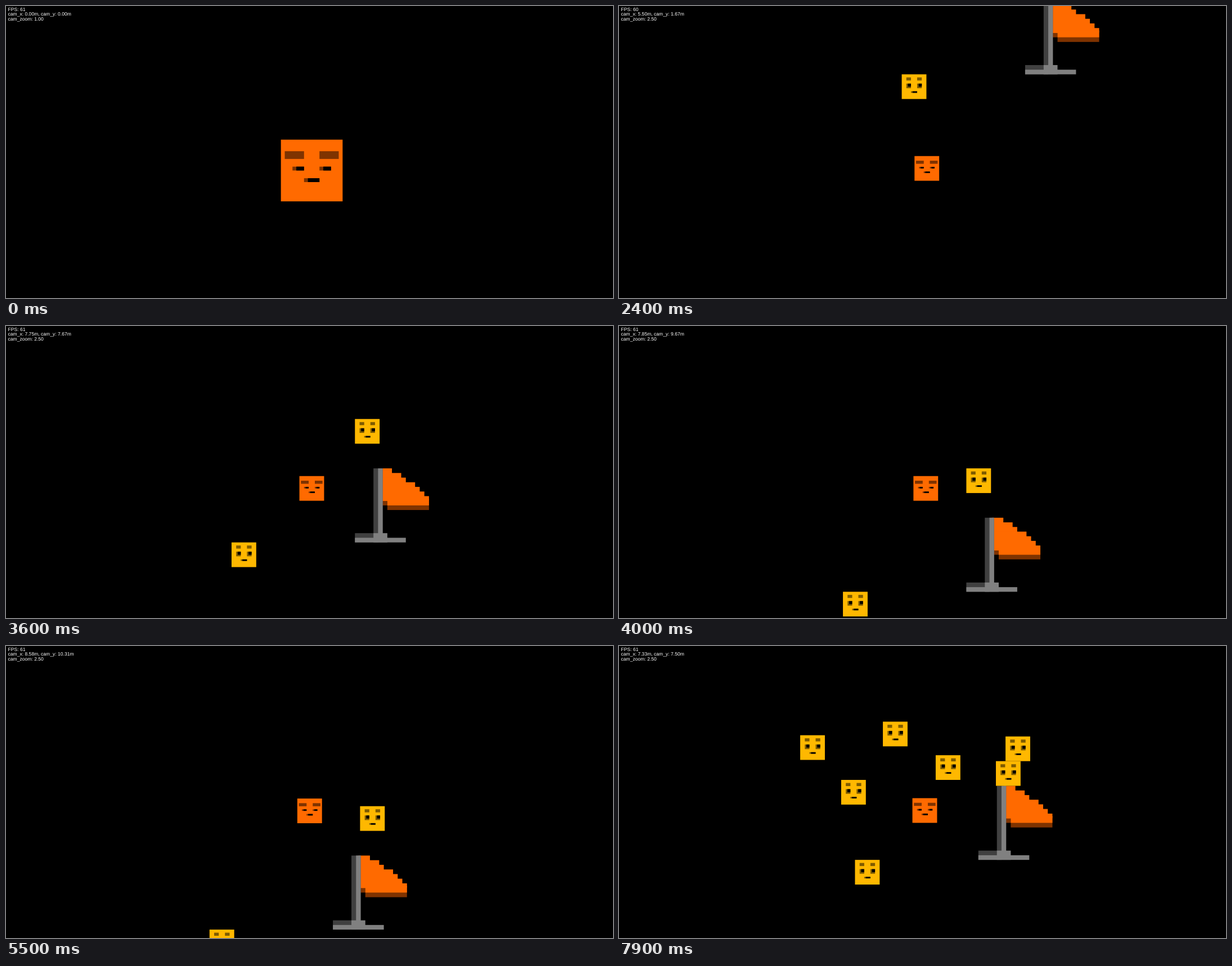
These frames come from a looping animation (1079x519 px, 8000 ms). An HTML page with a canvas:

```html
<!DOCTYPE html>
<html lang="en">
<head>
<meta charset="utf-8">
<title>Block camera</title>
<style>
  html, body { margin: 0; width: 100%; height: 100%; overflow: hidden; background: #000; }
  canvas, svg { position: absolute; left: 0; top: 0; width: 1079px; height: 519px; display: block; }
  text {
    font: 8.57px "Liberation Sans", Arial, sans-serif;
    fill: #fff;
    text-rendering: geometricPrecision;
  }
</style>
</head>
<body>
<canvas id="stage" width="1079" height="519"></canvas>
<svg viewBox="0 0 1079 519">
  <text id="fps" x="3.5" y="8.9"></text>
  <text id="pos" x="3.5" y="17.4"></text>
  <text id="zoom" x="3.5" y="26"></text>
</svg>
<script>
const LOOP = 8000, STEP = 100;
const METRE = 109.67;                        // pixels per metre at zoom 1
const CENTRE = { x: 543.5, y: 292.4 };
const SPEED = 5, ACCEL = 35, PUSH = 0.515;   // m/s, m/s², share of speed left when pushing
const ORANGE = '#ff6a00', RUST = '#7f3300', YELLOW = '#ffb800', OLIVE = '#7f5c00';
const GREY = '#808080', DARK = '#404040', BLACK = '#000';

// Each key press: axis, start in ms, metres travelled, metres before touching the block
const MOVES = [
  { axis: 'x', at: 1225, dist: 7.75 },
  { axis: 'y', at: 1991, dist: 10.33 },
  { axis: 'x', at: 3922, dist: 2.35, free: 1.25 },
  { axis: 'x', at: 5120, dist: -2.773 },
  { axis: 'y', at: 5466, dist: -2.83 },
];
// Blocks set down by clicks
const CLICKS = [
  { at: 6600, x: 2.78, y: 10.05 },
  { at: 6900, x: 6.13, y: 10.6 },
  { at: 7100, x: 8.27, y: 9.24 },
  { at: 7400, x: 4.44, y: 8.24 },
  { at: 7700, x: 10.71, y: 9 },
];
const DIPS = [600, 2400, 6700], DIP_TIME = 900;
const BLINK_FROM = 1500, BLINK_EVERY = 2700, BLINK_TIME = 700;

// Sprites are lists of [colour, x, y, width, height] on a 16 x 16 grid.
function face(skin, shade, brow, eye, mouth) {
  const shaded = (x, y, w, h) => [
    [shade, x, y, w, h],
    [BLACK, x + 1, y, w - 1, Math.max(1, h - 1)]];
  return [
    [skin, 0, 0, 16, 16],
    [shade, brow.x, brow.y, brow.w, 2], [shade, 10, brow.y, brow.w, 2],
    ...shaded(3, eye.y, 3, eye.h), ...shaded(10, eye.y, 3, eye.h),
    ...shaded(6, mouth.y, 4, mouth.h)];
}
const SLEEPY = face(ORANGE, RUST, { x: 1, y: 3, w: 5 }, { y: 7, h: 1 }, { y: 10, h: 1 });
const AWAKE = face(ORANGE, RUST, { x: 1, y: 2, w: 5 }, { y: 6, h: 3 }, { y: 10, h: 3 });
const BLOCK = face(YELLOW, OLIVE, { x: 3, y: 2, w: 3 }, { y: 6, h: 3 }, { y: 11, h: 1 });

// Parts overlap so that soft edges leave no seams.
const cloth = Array.from({ length: 7 }, (_, row) => {
  const end = Math.min(16, Math.ceil(8 + 1.35 * row));
  return [ORANGE, 5.5, row, end - 5.5, 7 - row];
});
const FLAG = [
  [RUST, 7, 7, 9, 2], [RUST, 5.5, 6.5, 1.5, 1.5],
  ...cloth, [ORANGE, 7, 6.5, 9, 1.5],
  [DARK, 4, 0, 2, 15], [DARK, 0, 14, 5, 2],
  [GREY, 5, 0, 1, 15], [GREY, 4, 14, 3, 2], [GREY, 0, 15, 11, 1]];

const ctx = document.getElementById('stage').getContext('2d');
const label = (id, text) => { document.getElementById(id).textContent = text; };
const clamp = (v, lo, hi) => Math.min(hi, Math.max(lo, v));

// Distance covered while speeding up, then at full speed
function run(sec) {
  const ramp = SPEED / ACCEL;
  if (sec <= 0) return 0;
  return sec < ramp ? ACCEL * sec * sec / 2 : SPEED * (sec - ramp / 2);
}

function place(t) {
  const p = { x: 0, y: 0 };
  for (const { axis, at, dist, free = Infinity } of MOVES) {
    const s = run((t - at) / 1000);
    const gone = s < free ? s : free + (s - free) * PUSH;
    p[axis] += Math.sign(dist) * Math.min(gone, Math.abs(dist));
  }
  return p;
}

// The pushed block stays where the player was furthest right.
const pushedX = (t) => Math.max(10, place(Math.min(t, 5000)).x + 1);

function render(t) {
  const zoom = 1 + 0.25 * clamp(t / STEP - 3, 0, 6);
  const scale = METRE / zoom;
  const player = place(t), shown = place(t - 4), cam = place(t - 17);

  const sprite = (parts, left, top, size = 1) => {
    const x = CENTRE.x + (left - cam.x - 0.5) * scale;
    const y = CENTRE.y - (top - cam.y + 0.5) * scale;
    const px = size * scale / 16;
    for (const [colour, px0, py0, w, h] of parts) {
      ctx.fillStyle = colour;
      ctx.fillRect(x + px0 * px, y + py0 * px, w * px, h * px);
    }
  };

  ctx.fillStyle = BLACK;
  ctx.fillRect(0, 0, 1079, 519);
  sprite(FLAG, 10, 8, 3);
  sprite(BLOCK, 5, 5);
  sprite(BLOCK, pushedX(t), 10);
  for (const c of CLICKS) if (t >= c.at) sprite(BLOCK, c.x, c.y);
  const awake = t >= BLINK_FROM && (t - BLINK_FROM) % BLINK_EVERY < BLINK_TIME;
  sprite(awake ? AWAKE : SLEEPY, player.x, player.y);

  const slow = DIPS.some((from) => t >= from && t < from + DIP_TIME);
  label('fps', 'FPS: ' + (slow ? 60 : 61));
  label('pos', `cam_x: ${shown.x.toFixed(2)}m, cam_y: ${shown.y.toFixed(2)}m`);
  label('zoom', 'cam_zoom: ' + zoom.toFixed(2));
}

const start = performance.now();
function tick() {
  const t = (performance.now() - start) % LOOP;
  render(Math.floor(t / STEP) * STEP);
  requestAnimationFrame(tick);
}
tick();
</script>
</body>
</html>
```
